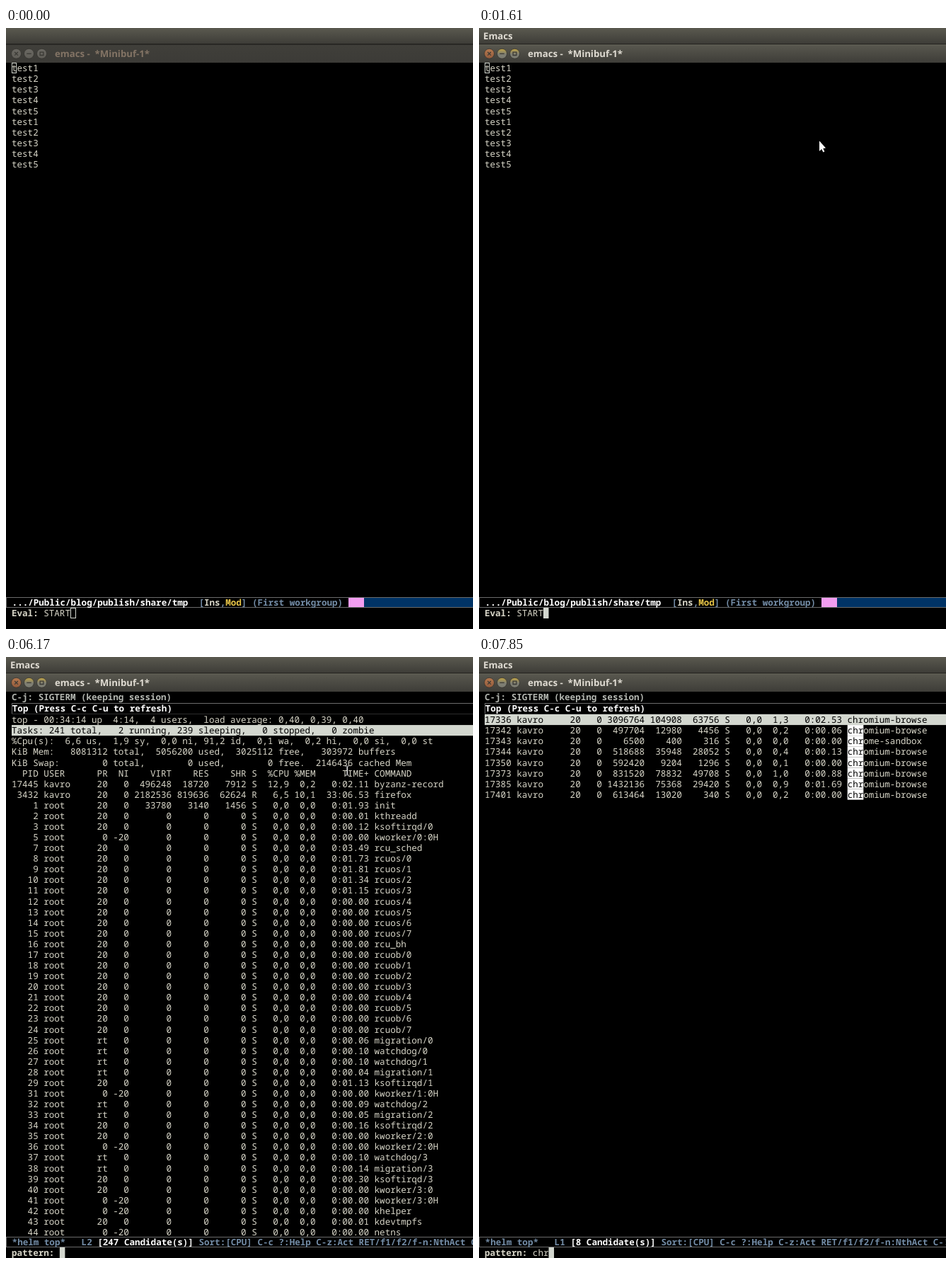
These frames come from a looping animation (660 by 849 pixels, 8 s). An HTML page with a canvas:

```html
<!DOCTYPE html>
<html lang="en">
<head>
<meta charset="utf-8">
<title>Process list</title>
<style>
html, body { margin: 0; width: 100%; height: 100%; overflow: hidden; background: #000; }
canvas { display: block; }
</style>
</head>
<body>
<canvas id="stage" width="660" height="849"></canvas>
<script>
const ctx = document.getElementById("stage").getContext("2d");
const W = 660, H = 849, LOOP = 8000;
const CW = 7.54, LH = 15.08, LEFT = 8, LIST_TOP = 81;
const MONO = '12.57px "Noto Sans Mono", "DejaVu Sans Mono", monospace';
const UI = 'bold 13.2px "Open Sans", "Noto Sans", sans-serif';
const FG = "#d8d6c8", BAR = "#d3d7cf", WHITE = "#fff", STEEL = "#738ca6", LINE = "#6b6b6b", GOLD = "#e8c547";
const USER = "kavro";

ctx.textRendering = "geometricPrecision";

function box(x, y, w, h, color) {
  ctx.fillStyle = color;
  ctx.fillRect(x, y, w, h);
}

function frame(x, y, w, h, color) {
  ctx.strokeStyle = color;
  ctx.lineWidth = 1;
  ctx.strokeRect(x + 0.5, y + 0.5, w - 1, h - 1);
}

function text(s, x, top, color = FG, bold = false) {
  ctx.font = (bold ? "bold " : "") + MONO;
  ctx.fillStyle = color;
  ctx.fillText(s, x, top + 12.2);
}

// Writes [text, color] pairs one after another on the character grid.
function runs(parts, x, top) {
  for (const [s, color] of parts) {
    text(s, x, top, color, true);
    x += s.length * CW;
  }
}

function label(s, x, y, color) {
  ctx.font = UI;
  ctx.fillStyle = color;
  ctx.fillText(s, x, y);
}

// ---- process table ----

function row(pid, user, pr, ni, virt, res, shr, s, cpu, mem, time, cmd) {
  const right = [[pr, 4], [ni, 4], [virt, 8], [res, 7], [shr, 7], [s, 2], [cpu, 6], [mem, 5], [time, 10]];
  return String(pid).padStart(5) + " " + user.padEnd(8) +
    right.map(([v, n]) => String(v).padStart(n)).join("") + " " + cmd;
}

function kernelRows() {
  const names = ("kthreadd=0.01 ksoftirqd/0=0.12 - kworker/0:0H - rcu_sched=3.49 " +
    "rcuos/0=1.73 rcuos/1=1.81 rcuos/2=1.34 rcuos/3=1.15 rcuos/4 rcuos/5 rcuos/6 rcuos/7 rcu_bh " +
    "rcuob/0 rcuob/1 rcuob/2 rcuob/3 rcuob/4 rcuob/5 rcuob/6 rcuob/7 " +
    "migration/0=0.06 watchdog/0=0.10 watchdog/1=0.10 migration/1=0.04 ksoftirqd/1=1.13 - " +
    "kworker/1:0H watchdog/2=0.09 migration/2=0.05 ksoftirqd/2=0.16 kworker/2:0 kworker/2:0H " +
    "watchdog/3=0.10 migration/3=0.14 ksoftirqd/3=0.30 kworker/3:0 kworker/3:0H " +
    "khelper kdevtmpfs=0.01 netns").split(" ");
  const rows = [];
  names.forEach((entry, i) => {
    if (entry === "-") return;
    const [name, time = "0.00"] = entry.split("=");
    const realtime = /^(migration|watchdog)/.test(name);
    const urgent = /H$|^khelper|^netns/.test(name);
    rows.push(row(i + 2, "root", realtime ? "rt" : urgent ? 0 : 20, urgent ? -20 : 0,
      0, 0, 0, "S", "0,0", "0,0", "0:0" + time, name));
  });
  return rows;
}

const browser = [
  [17336, 3096764, 104908, 63756, "1,3", "2.53"],
  [17342, 497704, 12980, 4456, "0,2", "0.06"],
  [17343, 6500, 400, 316, "0,0", "0.00"],
  [17344, 518688, 35948, 28052, "0,4", "0.13"],
  [17350, 592420, 9204, 1296, "0,1", "0.00"],
  [17373, 831520, 78832, 49708, "1,0", "0.88"],
  [17385, 1432136, 75368, 29420, "0,9", "1.69"],
  [17401, 613464, 13020, 340, "0,2", "0.00"]
].map(([pid, virt, res, shr, mem, time]) =>
  row(pid, USER, 20, 0, virt, res, shr, "S", "0,0", mem, "0:0" + time,
    pid === 17343 ? "chrome-sandbox" : "chromium-browse"));

const table = [
  "top - 00:34:14 up  4:14,  4 users,  load average: 0,40, 0,39, 0,40",
  "Tasks: 241 total,   2 running, 239 sleeping,   0 stopped,   0 zombie",
  "%Cpu(s):  6,6 us,  1,9 sy,  0,0 ni, 91,2 id,  0,1 wa,  0,2 hi,  0,0 si,  0,0 st",
  "KiB Mem:   8081312 total,  5056200 used,  3025112 free,   303972 buffers",
  "KiB Swap:        0 total,        0 used,        0 free.  2146436 cached Mem",
  row("PID", "USER", "PR", "NI", "VIRT", "RES", "SHR", "S", "%CPU", "%MEM", "TIME+", "COMMAND"),
  row(17445, USER, 20, 0, 496248, 18720, 7912, "S", "12,9", "0,2", "0:02.11", "byzanz-record"),
  row(3432, USER, 20, 0, 2182536, 819636, 62624, "R", "6,5", "10,1", "33:06.53", "firefox"),
  row(1, "root", 20, 0, 33780, 3140, 1456, "S", "0,0", "0,0", "0:01.93", "init"),
  ...kernelRows()
];

// ---- window chrome ----

function shade(y, h, top, bottom) {
  const g = ctx.createLinearGradient(0, y, 0, y + h);
  g.addColorStop(0, top);
  g.addColorStop(1, bottom);
  box(0, y, W, h, g);
}

function button(x, kind, focused) {
  const y = 36.3;
  const g = ctx.createLinearGradient(0, y - 7, 0, y + 7);
  const [a, b] = !focused ? ["#6a6862", "#5f5d57"] : kind === "close" ? ["#b57a50", "#925a3b"] : ["#c2a545", "#7d7d72"];
  g.addColorStop(0, a);
  g.addColorStop(focused && kind !== "close" ? 0.55 : 1, b);
  ctx.beginPath();
  ctx.arc(x, y, 7, 0, 7);
  ctx.fillStyle = g;
  ctx.fill();
  ctx.strokeStyle = "#33322e";
  ctx.lineWidth = 0.8;
  ctx.stroke();
  ctx.strokeStyle = "#3b3a35";
  ctx.lineWidth = 1.3;
  ctx.beginPath();
  if (kind === "close") {
    ctx.moveTo(x - 2.3, y - 2.3); ctx.lineTo(x + 2.3, y + 2.3);
    ctx.moveTo(x + 2.3, y - 2.3); ctx.lineTo(x - 2.3, y + 2.3);
  } else if (kind === "min") {
    ctx.moveTo(x - 3.2, y); ctx.lineTo(x + 3.2, y);
  } else {
    ctx.rect(x - 2.4, y - 2.2, 4.8, 4.4);
  }
  ctx.stroke();
}

function chrome(title, focused, menu) {
  shade(0, 22, "#5a594f", "#3e3d38");
  box(0, 22, W, 1.5, "#272622");
  if (focused) {
    shade(23.5, 25.5, "#59584f", "#3e3d38");
    box(0, 23.5, W, 1, "#67665b");
  } else {
    shade(23.5, 25.5, "#403f3a", "#3c3b37");
  }
  ["close", "min", "max"].forEach((kind, i) => button(14.5 + 18 * i, kind, focused));
  label(title, 69, 41, focused ? "#dfdbd2" : "#837465");
  if (menu) {
    ctx.globalAlpha = menu;
    label("Emacs", 6, 16, "#dfdbd2");
    ctx.globalAlpha = 1;
  }
}

function arrow() {
  const pts = [[481, 159.5], [481, 174], [484.2, 171], [486.4, 175.6], [488.4, 174.6], [486.3, 170.2], [490, 169.6]];
  ctx.beginPath();
  pts.forEach(([x, y]) => ctx.lineTo(x, y));
  ctx.closePath();
  ctx.fillStyle = WHITE;
  ctx.fill();
}

function beam() {
  box(481.5, 154.5, 1.4, 12, WHITE);
  for (const y of [153.5, 166.5]) {
    box(479.5, y, 2, 1, WHITE);
    box(482.6, y, 2, 1, WHITE);
  }
}

// ---- editor ----

function modeLine(top, parts) {
  box(0, top, W, 15, "#000");
  frame(0, top, W + 2, 15, LINE);
  runs(parts, 8.6, top - 0.3);
}

function cursor(x, top, solid) {
  if (solid) box(x, top, CW, LH, BAR);
  else frame(Math.round(x), Math.round(top), 8, 15, BAR);
}

function fileView(t) {
  const prompt = t < 3160, focused = t >= 1510;
  if (!prompt) cursor(LEFT, 49, true);
  for (let i = 0; i < 10; i++) text("test" + (i % 5 + 1), LEFT, 49 + i * LH);
  if (prompt) frame(8, 49, 7, 15, BAR);
  else text("t", LEFT, 49, "#000");

  const top = prompt ? 804 : 819;
  modeLine(top, [
    [".../Public/blog/publish/share/tmp", WHITE], ["  [", STEEL], ["Ins", FG], [",", STEEL],
    ["Mod", GOLD], ["]", STEEL], [" (First workgroup)", STEEL]
  ]);
  box(506, top + 1, W - 506, 13, "#003366");
  box(484, top + 1, 22, 13, "#f29df0");

  if (prompt) {
    text("Eval:", LEFT, 819, FG, true);
    text("START", LEFT + 6 * CW, 819);
    cursor(LEFT + 11 * CW, 819, focused);
  } else if (t < 3620) {
    text("Quit", LEFT, 834);
  }
}

function topView(t) {
  const pattern = t < 7420 ? "" : t < 7480 ? "c" : t < 7810 ? "ch" : "chr";
  const query = t < 7550 ? "" : t < 7850 ? "ch" : "chr";
  const rows = query === "chr" ? browser : query ? table.filter(r => r.includes(query)).concat(browser) : table;
  const count = query ? rows.length : 247;
  const picked = at => query ? 0 : [6170, 6370, at, 6830].filter(s => t >= s).length;
  const selected = picked(6600);

  text("C-j: SIGTERM (keeping session)", LEFT, 49, "#b4b7b1", true);
  box(8, 65, W, 1, LINE);
  box(8, 65, 1, 15, LINE);
  box(8, 80, W, 1, "#2c2c2c");
  text("Top (Press C-c C-u to refresh)", LEFT + 0.8, 65, WHITE, true);

  rows.forEach((line, i) => {
    const top = LIST_TOP + i * LH;
    if (i === selected) {
      box(LEFT, top, W, LH, BAR);
      text(line, LEFT, top, "#000");
      return;
    }
    text(line, LEFT, top);
    const hit = query ? line.indexOf(query) : -1;
    if (hit >= 0) {
      const x = LEFT + hit * CW;
      box(x, top, query.length * CW, LH, WHITE);
      text(query, x, top, "#000");
    }
  });

  modeLine(819, [
    ["*helm top*   L" + (picked(6640) + 1) + " ", STEEL], ["[" + count + " Candidate(s)]", WHITE],
    [" Sort:[CPU] C-c ?:Help C-z:Act RET/f1/f2/f-n:NthAct C-!:Tog-suspend", STEEL]
  ]);
  box(0, 834, W, 15, "#000");
  text("pattern:", LEFT, 834, FG, true);
  text(pattern, LEFT + 9 * CW, 834);
  cursor(LEFT + (9 + pattern.length) * CW, 834, true);
}

function draw(t) {
  box(0, 0, W, H, "#000");
  const listing = t >= 4880;
  if (listing) topView(t); else fileView(t);
  const title = t >= 3210 && t < 4930 ? "emacs - tmp" : "emacs -  *Minibuf-1*";
  chrome(title, t >= 1470, t < 1560 ? 0 : t < 1610 ? 0.5 : 1);
  if (listing) {
    if (t < 7380) beam();
  } else if (t >= 1420) {
    arrow();
  }
}

const start = performance.now();
function tick() {
  draw((performance.now() - start) % LOOP);
  requestAnimationFrame(tick);
}
tick();
</script>
</body>
</html>
```
